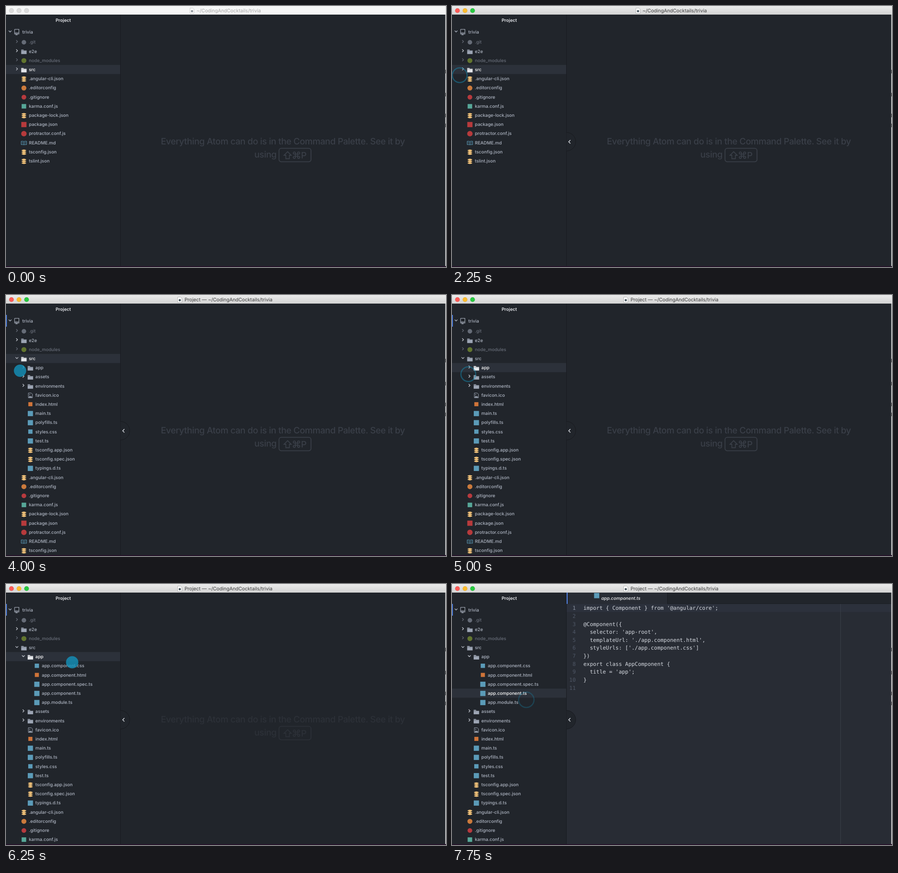
These frames come from a looping animation (971 px wide and 577 px high, 8 s). An HTML page:

```html
<!DOCTYPE html>
<html lang="en">
<head>
<meta charset="utf-8">
<title>Project tree</title>
<style>
html, body { margin: 0; width: 100%; height: 100%; overflow: hidden; background: #21252b; }
svg { display: block; width: 100vw; height: 100vh; }
text { font: 500 9.9px Inter, "Open Sans", sans-serif; text-rendering: geometricPrecision; white-space: pre; }
.title { font-size: 10.65px; font-weight: 400; }
.head { font-weight: 600; fill: #e6e8ec; }
.tip { font-size: 19.5px; letter-spacing: -.4px; fill: #3a3f48; }
.tab { font-style: italic; fill: #f2f3f5; }
.code { font: 11.77px "DejaVu Sans Mono", "Liberation Mono", monospace; fill: #d6dae1; }
.num { fill: #4f5766; text-anchor: end; }
</style>
</head>
<body>
<svg id="stage" viewBox="0 0 971 577"></svg>
<script>
const LOOP = 8000, STEP = 250;
const EVENT = {
  toggle: 1250, activate: 2000, focus: 3000, openSrc: 3250,
  pickApp: 4750, openApp: 5250, pickFile: 7500, openFile: 7750
};
const CLICKS = [2250, 3000, 5000, 7500];
const PATH = [
  [750, 795, 13], [1000, 560, 90], [1250, 190, 140], [1500, 32, 131],
  [1750, 14, 148], [2000, 17, 153], [2500, 17, 153], [2750, 22, 154],
  [3500, 23, 156], [4250, 35, 173], [4500, 36, 175], [5500, 36, 175],
  [5750, 40, 172], [6000, 92, 167], [6250, 146, 173], [6500, 162, 218],
  [6750, 163, 254], [7000, 163, 254], [7250, 164, 256], [8000, 164, 256]
];
const TEXT = "#b0b7c4", DIM = "#686e79", BRIGHT = "#fff", BLUE = "#5b9bb8";

// Each entry: name, kind, depth
const list = (depth, rows) => rows.split(" ").map(r => [...r.split(":"), depth]);
const TOP = list(0, ".git:git e2e:dir node_modules:node src:dir");
const APP = list(2, "app.component.css:css app.component.html:html app.component.spec.ts:ts app.component.ts:ts app.module.ts:ts");
const SRC = list(1, "app:dir assets:dir environments:dir favicon.ico:image index.html:html main.ts:ts polyfills.ts:ts styles.css:css test.ts:ts tsconfig.app.json:json tsconfig.spec.json:json typings.d.ts:ts");
const REST = list(0, ".angular-cli.json:json .editorconfig:editor .gitignore:ignore karma.conf.js:karma package-lock.json:json package.json:pack protractor.conf.js:proto README.md:book tsconfig.json:json tslint.json:json");
const CODE = `import { Component } from '@angular/core';

@Component({
  selector: 'app-root',
  templateUrl: './app.component.html',
  styleUrls: ['./app.component.css']
})
export class AppComponent {
  title = 'app';
}
`.split("\n");

const rect = (x, y, w, h, fill, more = "") =>
  `<rect x="${x}" y="${y}" width="${w}" height="${h}" fill="${fill}" ${more}/>`;
const circle = (x, y, r, fill, more = "") =>
  `<circle cx="${x}" cy="${y}" r="${r}" fill="${fill}" ${more}/>`;
const line = (d, stroke, width = 1, more = "") =>
  `<path d="${d}" fill="none" stroke="${stroke}" stroke-width="${width}" ${more}/>`;
const text = (x, y, str, cls = "", fill = "") =>
  `<text x="${x}" y="${y}" class="${cls}" ${fill && `style="fill:${fill}"`}>${str}</text>`;
const square = (x, y, size, fill) => rect(x - size / 2, y - size / 2, size, size, fill);

const chevron = (x, y, open, color) => line(
  open ? `M${x - 3} ${y - 2}l3 3l3 -3` : `M${x - 1.5} ${y - 3.5}l3 3l-3 3`, color, 1.3);

const ICONS = {
  dir: (x, y, c) => `<path d="M${x - 6} ${y - 4}h5l1 1.6h6v8.2h-12z" fill="${c}"/>`
    + line(`M${x - 6} ${y - 1.8}h12`, "#21252b", .5),
  json: (x, y) => [-4, -.1, 3.8].map(d =>
    `<path d="M${x - 5} ${y + d}q5 -3 10 0v1.3q-5 3 -10 0z" fill="#f2c37a"/>`
    + line(`M${x - 5} ${y + d + 1.9}q5 3 10 0`, "#21252b", 1)).join(""),
  image: (x, y, c) => line(`M${x - 4.5} ${y - 5}h6.5l2.5 2.5v8h-9z`, c)
    + `<path d="M${x - 4} ${y + 5}l2.5 -4l2 2l1.5 -1.5l2 3.5z" fill="${c}"/>` + circle(x - 1.5, y - 1.5, 1, c),
  book: (x, y) => line(`M${x - 6} ${y - 3.5}h5l1 1l1 -1h5v7.5h-5l-1 1l-1 -1h-5zM${x} ${y - 2.5}v7`, BLUE)
    + line(`M${x - 4.5} ${y - 1}h3M${x - 4.5} ${y + 1.5}h3M${x + 1.5} ${y - 1}h3M${x + 1.5} ${y + 1.5}h3`, BLUE, .8),
  git: (x, y) => circle(x, y, 5, "#666c77"),
  node: (x, y) => circle(x, y, 5.5, "#62752f"),
  editor: (x, y) => circle(x, y, 5.5, "#cb7a3c"),
  ignore: (x, y) => circle(x, y, 5.2, "#b73a3e"),
  karma: (x, y) => square(x, y, 10, "#57a798"),
  pack: (x, y) => square(x, y, 11.5, "#b63a3c"),
  proto: (x, y) => circle(x, y, 6, "#b63a3c"),
  html: (x, y) => square(x, y - .5, 9, "#cf7439"),
  css: (x, y) => square(x, y - .5, 9.5, BLUE),
  ts: (x, y) => square(x, y, 11.5, BLUE)
};

function treeRows(t) {
  const src = t >= EVENT.openApp ? [SRC[0], ...APP, ...SRC.slice(1)] : SRC;
  return t >= EVENT.openSrc ? [...TOP, ...src, ...REST] : [...TOP, ...REST];
}

function tree(t) {
  const picked = t >= EVENT.pickFile ? "app.component.ts" : t >= EVENT.pickApp ? "app" : "src";
  const opened = { src: t >= EVENT.openSrc, app: t >= EVENT.openApp };
  const rows = treeRows(t).map(([name, kind, depth], i) => {
    const y = 79.5 + 20.2 * i, shift = 14.3 * depth;
    const ignored = kind === "git" || kind === "node";
    const on = name === picked;
    const color = on ? BRIGHT : ignored ? DIM : TEXT;
    return (on ? rect(0, y - 9.9, 252, 20.2, "#2c313a") : "")
      + (kind === "dir" || ignored ? chevron(24 + shift, y - .5, opened[name], ignored ? DIM : "#c8ccd4") : "")
      + ICONS[kind](39.5 + shift, y + .8, on ? "#e4e6ea" : "#9da5b4")
      + text(50.5 + shift, y + 3.8, name, "", color);
  });
  return text(109.5, 35.2, "Project", "head")
    + (t >= EVENT.openSrc ? rect(0, 44, 1.8, 26, "#568af2") : "")
    + chevron(9, 56.5, true, TEXT)
    + line("M19 51.5h9.5v10.5h-4M21.5 62h-2.5v-10.5M19 59.5h9.5M22 60v4l1.3 -1l1.3 1v-4", TEXT, 1.1)
    + text(36, 60.6, "trivia", "", TEXT)
    + rows.join("");
}

function titleBar(t) {
  const active = t >= EVENT.activate, focus = t >= EVENT.focus;
  const lights = active ? ["#fc5b57", "#fdbc2e", "#28c840"] : ["#dcdcdc", "#dcdcdc", "#dcdcdc"];
  const x = focus ? 379 : 406, path = "~/CodingAndCocktails/trivia";
  return rect(0, 0, 971, 19, active ? "url(#bar)" : "#f6f6f6")
    + lights.map((c, i) => circle(12 + 16.7 * i, 10.2, 5.1, c, `stroke="#000" stroke-opacity=".12" stroke-width=".7"`)).join("")
    + `<g opacity="${active ? 1 : .6}">`
    + `<path d="M${x} 4.5h6.5l2.5 2.5v9.5h-9z" fill="#fff" stroke="#999" stroke-width=".7"/>`
    + circle(x + 4.5, 11.5, 2.4, "#46535c") + "</g>"
    + text(focus ? 394 : 420.5, 14.1, (focus ? "Project — " : "") + path, "title", active ? "#3b3b3b" : "#a6a6a6");
}

function tip(t) {
  const opacity = Math.max(0, Math.min(1, 1 - (t - 5750) / 900));
  return `<g opacity="${opacity}">`
    + `<text x="611" y="306" class="tip" text-anchor="middle">Everything Atom can do is in the Command Palette. See it by</text>`
    + text(548, 335, "using", "tip")
    + rect(602.5, 314.7, 70.6, 29.6, "none", `rx="5" stroke="#3a3f48" stroke-width="1.8"`)
    + line("M621.5 322l8 8h-4v7.5h-8v-7.5h-4z", "#3a3f48", 1.8)
    + line("M15 6v12a3 3 0 1 0 3-3H6a3 3 0 1 0 3 3V6a3 3 0 1 0-3 3h12a3 3 0 1 0-3-3",
      "#3a3f48", 2.3, `transform="translate(631.5 320.2) scale(.8)"`)
    + text(651, 337, "P", "tip") + "</g>";
}

function editor() {
  return rect(253, 44, 716.5, 531, "#282c34") + rect(253, 19, 222, 25.5, "#282c34")
    + rect(475, 19, 1, 25, "#181a1f") + rect(476, 43.3, 493.5, .7, "#181a1f")
    + rect(253, 19, 2, 25, "#568af2")
    + ICONS.ts(319.3, 25.7) + text(329.5, 35, "app.component.ts", "tab")
    + rect(253, 44.3, 716.5, 17.6, "#2c313c")
    + rect(857, 44, 1, 531, "#3a3f49")
    + CODE.map((row, i) => {
      const y = 57.2 + 17.65 * i;
      return text(273, y, i + 1, "code num", i ? "" : "#8a92a0") + text(290, y, row, "code");
    }).join("");
}

const toggle = () =>
  `<path d="M252.5 279.5a20.5 20.5 0 0 1 0 41z" fill="#21252b"/>`
  + line("M252.5 279.5a20.5 20.5 0 0 1 0 41", "#181a1f")
  + line("M261.3 296.4l-3.8 3.8l3.8 3.8", "#d7dae0", 1.5);

function pointer(t) {
  if (t < PATH[0][0]) return "";
  const i = PATH.findIndex(p => p[0] > t);
  const [a, b] = [PATH[i - 1], PATH[i]];
  const k = (t - a[0]) / (b[0] - a[0]);
  const x = a[1] + (b[1] - a[1]) * k, y = a[2] + (b[2] - a[2]) * k;
  const age = CLICKS.map(c => t - c).find(d => d >= 0 && d <= STEP);
  if (age === undefined) return circle(x, y, 13.6, "#1490b8", `opacity=".82"`);
  return circle(x, y, age ? 17 : 16.3, "none",
    `stroke="#1490b8" stroke-width="2.6" opacity="${age ? .28 : .45}"`);
}

// Slivers of the window behind, along the right edge
const edge = () => rect(969.5, 0, 1.5, 577, "#e9e9e9")
  + [141, 192, 238, 260].map(y => rect(969.7, y, 1.3, 8, "#555")).join("");

function draw(t) {
  return `<defs><linearGradient id="bar" x2="0" y2="1"><stop stop-color="#ebebeb"/><stop offset="1" stop-color="#d3d3d3"/></linearGradient></defs>`
    + rect(0, 0, 971, 577, "#21252b")
    + tree(t)
    + rect(252, 19, 1, 556, "#181a1f")
    + (t >= EVENT.openFile ? editor() : tip(t))
    + (t >= EVENT.toggle ? toggle() : "")
    + titleBar(t) + edge()
    + rect(0, 575, 971, 2, "#26132a")
    + pointer(t);
}

const stage = document.getElementById("stage");
let shown = -1;
const start = performance.now();
function tick(now) {
  const t = Math.floor(Math.max(0, now - start) % LOOP / STEP) * STEP;
  if (t !== shown) {
    stage.innerHTML = draw(t);
    shown = t;
  }
  requestAnimationFrame(tick);
}
tick(start);
</script>
</body>
</html>
```
